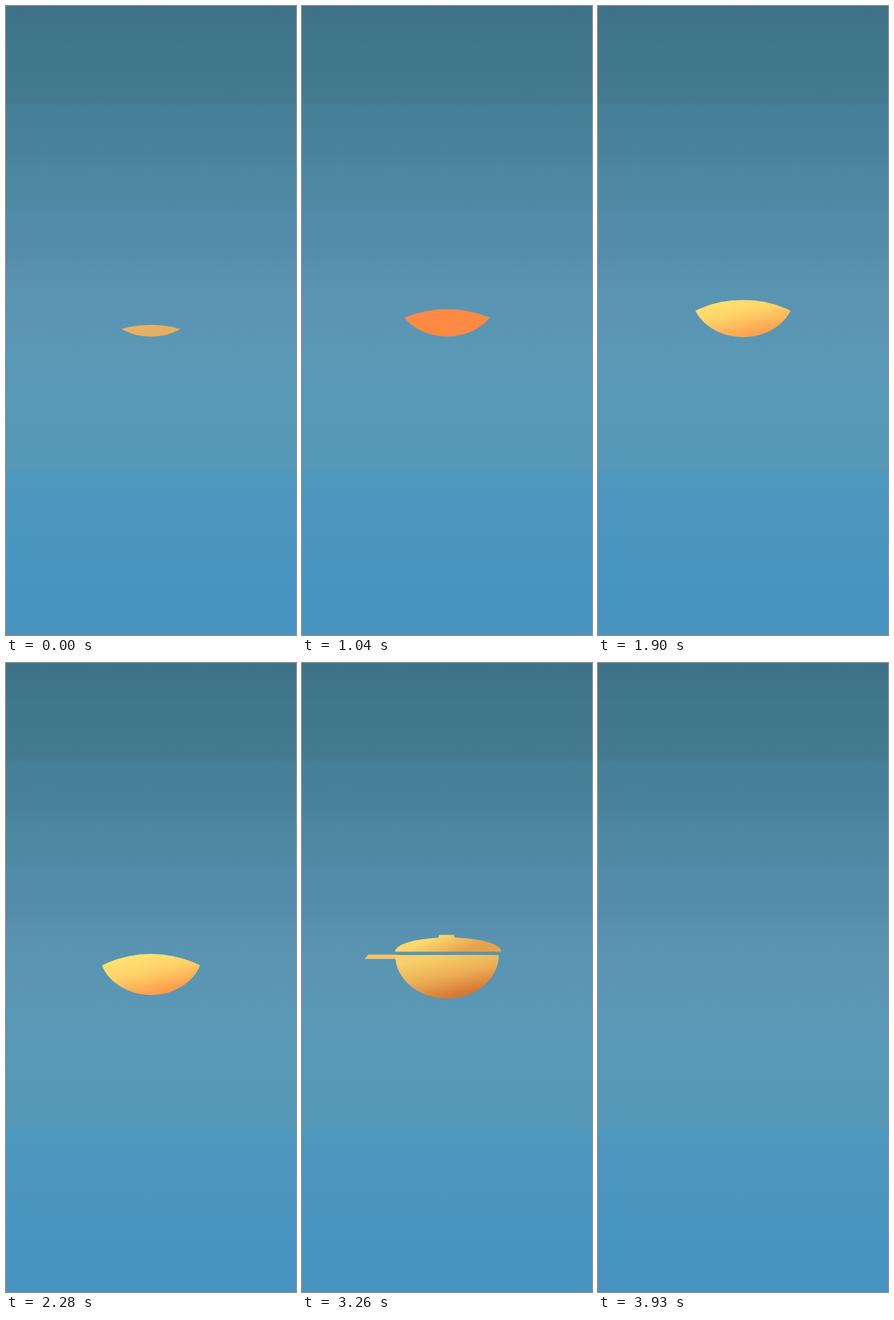
An HTML page that plays this animation: 333 by 720 pixels, repeating every 4.73 s.

```html
<!DOCTYPE html>
<html lang="en">
<head>
<meta charset="utf-8">
<title>Wok reveal</title>
<style>
  html, body { margin: 0; width: 100%; height: 100%; overflow: hidden; }
  body {
    background: linear-gradient(
      #3e7289 0, #3f758b 36px, #41778d 42px, #437a90 108px,
      #467f98 114px, #48829c 172px, #4c87a2 181px, #4f8aa5 234px,
      #528ca8 241px, #548eaa 290px, #5891b0 298px, #5994b1 332px,
      #5b98b6 400px, #5899b7 430px, #5698b7 528px, #4e97bf 537px,
      #4b96c0 620px, #4895c1 640px, #4893c0 720px);
  }
  svg { display: block; width: 100vw; height: 100vh; }
</style>
</head>
<body>
<svg viewBox="0 0 333 720" preserveAspectRatio="none">
  <defs>
    <clipPath id="reveal"><circle id="disc" cx="166.5" r="128"/></clipPath>
    <linearGradient id="bowlFill" gradientUnits="userSpaceOnUse" x1="158" y1="0" x2="169" y2="48">
      <stop offset="0"/><stop offset=".5"/><stop offset="1"/>
    </linearGradient>
    <linearGradient id="lidFill" gradientUnits="userSpaceOnUse" x1="158" y1="-22" x2="168" y2="2">
      <stop offset="0" stop-color="#fcd86c"/><stop offset="1" stop-color="#e6a24e"/>
    </linearGradient>
  </defs>
  <g id="scene" clip-path="url(#reveal)">
    <!-- local y = 0 is the rim of the bowl -->
    <g id="wok">
      <path fill="url(#lidFill)" d="M157-19v-3.2q0-.8.8-.8h16.4q.8 0 .8.8v3.2z"/>
      <path fill="url(#lidFill)" d="M107-3.8C107-13 134-20 168-20S229-13 229-3.8z"/>
      <path fill="#f4c566" d="M62-.5H108.5V4.5H58Q60 1 62-.5z"/>
      <path fill="url(#bowlFill)" d="M107 0H226A59.5 50 0 0 1 107 0z"/>
    </g>
  </g>
</svg>
<script>
const LOOP = 4730, HIDE = 3930, STEP = 20;
const $ = id => document.getElementById(id);
const stops = $('bowlFill').children;

// [ms, value]
const discTop = [[0, 365], [540, 355], [1040, 347], [1500, 340], [2280, 333],
  [2700, 329.8], [2940, 326.4], [3120, 313], [3240, 300], [3420, 268]];
const bowlBottom = [[0, 378.5], [1500, 378.3], [2280, 380], [2940, 381.5],
  [3240, 384], [3580, 387], [3780, 388.5], [3930, 389]];

// [ms, top, middle, bottom]
const tints = [
  [0, '#ecb96a', '#e9b46a', '#e6ae62'],
  [800, '#ff8a43', '#ff8a43', '#ff8a43'],
  [1260, '#ffe674', '#ffd368', '#ffab55'],
  [2280, '#ffe574', '#ffd067', '#ff9d4d'],
  [2940, '#ffe272', '#f9cd66', '#dd8f3f'],
  [3580, '#f0bd60', '#de9145', '#cc6229'],
  [3930, '#e8b05a', '#d98540', '#c85a26']
];
const SMOOTH_FROM = 1260;

function locate(table, t) {
  let i = 0;
  while (i < table.length - 2 && t >= table[i + 1][0]) i++;
  const a = table[i], b = table[i + 1];
  return [a, b, Math.min(1, (t - a[0]) / (b[0] - a[0]))];
}

function valueAt(table, t) {
  const [a, b, k] = locate(table, t);
  return a[1] + (b[1] - a[1]) * k;
}

const channels = hex => [1, 3, 5].map(i => parseInt(hex.slice(i, i + 2), 16));

function mix(from, to, k) {
  const end = channels(to);
  return `rgb(${channels(from).map((c, i) => Math.round(c + (end[i] - c) * k))})`;
}

function draw(now) {
  const t = Math.floor((now % LOOP) / STEP) * STEP;
  const visible = now % LOOP < HIDE;
  $('scene').style.display = visible ? '' : 'none';
  if (visible) {
    $('disc').setAttribute('cy', valueAt(discTop, t) + 128);
    $('wok').setAttribute('transform', `translate(0 ${valueAt(bowlBottom, t) - 50})`);
    const [a, b, k] = locate(tints, t);
    for (let i = 0; i < 3; i++) {
      stops[i].setAttribute('stop-color', mix(a[i + 1], b[i + 1], t < SMOOTH_FROM ? 0 : k));
    }
  }
}

const start = performance.now();
function tick() {
  draw(performance.now() - start);
  requestAnimationFrame(tick);
}
tick();
</script>
</body>
</html>
```
